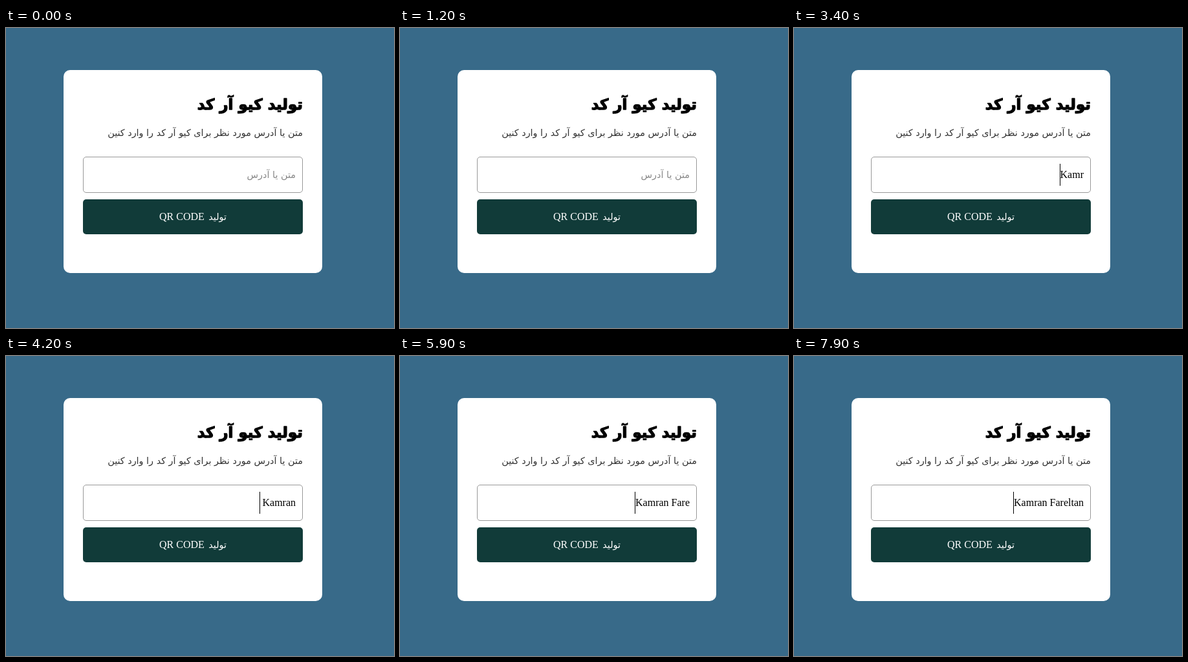
Write an HTML page that moves like this. It is 600 by 464 pixels and loops after 8000 ms.

```html
<!DOCTYPE html>
<html lang="fa">
<head>
<meta charset="utf-8">
<title>تولید کیو آر کد</title>
<style>
  html, body { margin: 0; width: 100%; height: 100%; overflow: hidden; background: #386a89; }
  svg { display: block; }
  .fa { font: 14.4px "DejaVu Sans", sans-serif; direction: rtl; }
  .en { font: 16px "Liberation Serif", "Times New Roman", serif; }
  .title { font-size: 23px; font-weight: bold; stroke: #000; stroke-width: 1.3; stroke-linejoin: round; }
</style>
</head>
<body>
<svg width="600" height="464" viewBox="0 0 600 464">
  <rect x="89" y="65" width="400" height="314" rx="10" fill="#fff"/>
  <text class="fa title" x="459" y="126">تولید کیو آر کد</text>
  <text class="fa" x="459" y="167" fill="#333">متن یا آدرس مورد نظر برای کیو آر کد را وارد کنین</text>

  <rect x="119.5" y="199.5" width="339" height="55" rx="4.5" fill="#fff" stroke="#999"/>
  <text class="fa" id="hint" x="448" y="232" fill="#888">متن یا آدرس</text>
  <text class="en" id="value" x="448" y="232" text-anchor="end"></text>
  <rect id="caret" y="210" width="1" height="34"/>

  <rect x="119" y="265" width="340" height="54" rx="5" fill="#113b39"/>
  <text class="en" x="237" y="297" fill="#fff">QR CODE</text>
  <text class="fa" x="341" y="297" fill="#fff">تولید</text>
</svg>
<script>
const LOOP = 8000, FOCUS = 2200, BLINK = 600, SPACE = 4;
const NAME = "Kamran Fareltan";
// Time of each key press, in ms
const KEYS = [2600, 2900, 3200, 3400, 3700, 3900, 4200,
              5100, 5400, 5700, 5900, 6200, 6400, 6500, 6700];
const [hint, value, caret] = ["hint", "value", "caret"].map(id => document.getElementById(id));
const show = (el, on) => el.setAttribute("visibility", on ? "visible" : "hidden");

function draw(now) {
  const t = now % LOOP;
  const count = KEYS.filter(k => k <= t).length;
  const typed = NAME.slice(0, count);
  const word = typed.trimEnd();
  value.textContent = word;
  show(hint, !count);

  // A trailing space only moves the caret, as the field runs right to left
  const width = (word ? value.getComputedTextLength() : 0) + (typed.length - word.length) * SPACE;
  caret.setAttribute("x", Math.floor(447.9 - width));

  // The caret restarts its blink at every key press
  const last = count ? KEYS[count - 1] : FOCUS;
  show(caret, t >= last && (t - last) % (2 * BLINK) < BLINK);
  requestAnimationFrame(draw);
}
requestAnimationFrame(draw);
</script>
</body>
</html>
```
